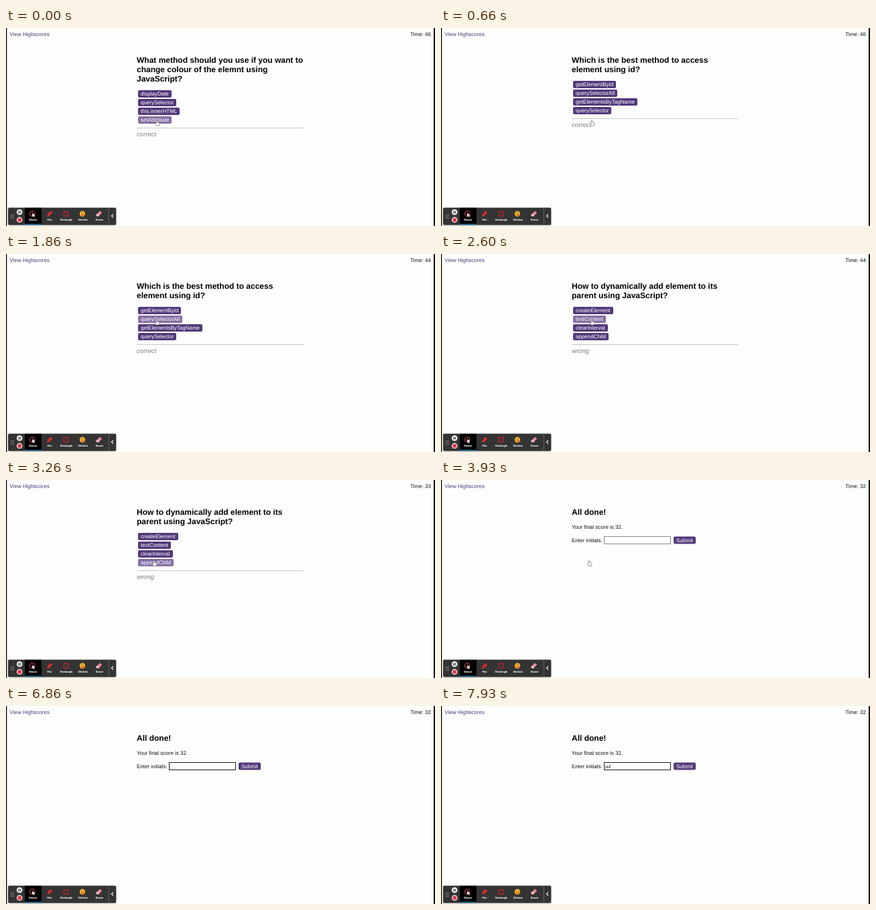
An HTML page for the animation above (8000 ms loop, 640x296 px).

```html
<!DOCTYPE html>
<html lang="en">
<head>
<meta charset="utf-8">
<title>Quiz</title>
<style>
  html, body { margin: 0; width: 100%; height: 100%; overflow: hidden; background: #fdfdfd; }
  #stage {
    position: relative; width: 640px; height: 296px; box-sizing: border-box; overflow: hidden;
    font: 8px/9px "Liberation Sans", Arial, sans-serif; color: #111;
    text-rendering: geometricPrecision; white-space: nowrap;
  }
  #stage > *, .done > * { position: absolute; }
  .scores { left: 5.5px; top: 5px; color: #483a7c; }
  .time { right: 6px; top: 5px; }
  .page { left: 195px; top: 41px; width: 249px; visibility: hidden; }
  h2 { margin: 0; font-size: 12px; line-height: 14px; color: #000; }
  .button {
    display: block; width: max-content; height: 11px; padding: 0 4px; border-radius: 2px;
    line-height: 11px; color: #fff; background: #53397b;
  }
  .button.hover { background: #8570a5; }
  .choices { padding: 10px 0 0 2px; }
  .choices .button { margin-bottom: 2px; }
  .feedback {
    margin-top: 6px; padding-top: 4px; border-top: 1px solid #c8c8cb;
    font: italic 9.6px/11px "Liberation Sans", Arial, sans-serif; color: #808080;
  }
  .score { left: 0; top: 25px; }
  .label { left: 0; top: 45px; }
  .field {
    left: 48px; top: 43px; width: 100px; height: 12px; box-sizing: border-box;
    padding: 1px 0 0 1px; border: 1px solid #8c8c8c; background: #fff;
  }
  .field.focus { border-color: #1c1c1c; }
  .caret { display: inline-block; width: 1px; height: 8px; background: #777; vertical-align: top; }
  .submit { left: 152px; top: 43px; transform: translateY(.5px); }
  svg { left: 0; top: 0; }
  .tools text { font: 700 4px Roboto, "Open Sans", sans-serif; fill: #fff; text-anchor: middle; }
</style>
</head>
<body>
<div id="stage">
  <div class="scores">View Highscores</div>
  <div class="time">Time: <span id="time">46</span></div>

  <div class="page done">
    <h2>All done!</h2>
    <div class="score">Your final score is 32.</div>
    <div class="label">Enter initials:</div>
    <div class="field" id="field"><span id="typed"></span><span class="caret" id="caret"></span></div>
    <div class="button submit">Submit</div>
  </div>

  <svg width="640" height="296" viewBox="0 0 640 296">
    <path d="M0 0H1.3V296H0ZM638 0H640V296H638Z"/>

    <g class="tools">
      <rect x="2.6" y="268.2" width="162.2" height="27" rx="2.4" fill="#000" opacity=".25"/>
      <rect x="3.2" y="268.8" width="161" height="25.8" rx="1.8" fill="#343434"/>
      <path d="M153.4 268.8v25.8" stroke="#777" stroke-width=".7"/>
      <rect x="28" y="268.8" width="25" height="25.4" fill="#000"/>
      <rect x="28" y="292.8" width="25" height="1.3" fill="#1b7fb8"/>
      <path d="M8 279v6M10.7 279v6" stroke="#bbb" stroke-width="1.2" stroke-dasharray="1.2 1.2"/>
      <circle cx="20.2" cy="275.3" r="4.3" fill="#eee"/>
      <path d="M19.1 273.4v3.8M21.3 273.4v3.8" stroke="#333" stroke-width="1.2"/>
      <circle cx="20.2" cy="286.8" r="4.3" fill="#f3d5d8"/>
      <rect x="17.6" y="284.2" width="5.2" height="5.2" rx="1" fill="#dc3545"/>
      <circle cx="39.3" cy="277.5" r="3.8" fill="none" stroke="#e0444a" stroke-width="1.1"/>
      <path d="M39.2 276.4l4.6 3.8-2.1.3 1.2 2.1-1 .5-1.1-2.1-1.6 1.3z" fill="#fff"/>
      <path d="M66.6 273.6l2.6 2.4-4.4 4.4-3.6 1.5 1-3.7z" fill="#e52a2a"/>
      <rect x="86.3" y="274.6" width="6.8" height="6.4" fill="none" stroke="#d81f2a" stroke-width="1.1"/>
      <circle cx="114" cy="277.7" r="4.2" fill="#f4b62c"/>
      <path d="M112 278.6h5.4q-.4 3-2.7 3t-2.7-3z" fill="#d8702a"/>
      <circle cx="112.5" cy="276.6" r=".6" fill="#57330f"/>
      <circle cx="115.5" cy="276.6" r=".6" fill="#57330f"/>
      <path d="M140.2 273.6l3 2.6-5 5.2-3-.2-1-2z" fill="#e58b9b"/>
      <path d="M136.2 277.5l3 2.8-1 1.1-3-.2-1-2z" fill="#efc0c8"/>
      <path d="M160 278.3l-2.6 2.7 2.6 2.7" fill="none" stroke="#fff" stroke-width="1.1"/>
      <text x="40.3" y="288.4">Mouse</text>
      <text x="65" y="288.4">Pen</text>
      <text x="90" y="288.4">Rectangle</text>
      <text x="114.8" y="288.4">Stickers</text>
      <text x="139.5" y="288.4">Eraser</text>
    </g>

    <g id="cursor" fill="#fff" stroke="#555" stroke-width=".6" stroke-linejoin="round">
      <path id="hand" d="M-.9 .6Q0-.4 .9 .6V3L3.4 3.7Q4.2 4 4 5L3.4 8H-1L-2.9 5.2Q-2.6 4-.9 5Z"/>
      <path id="arrow" d="M0 0V8L1.9 6.3 3 9 4.2 8.5 3.1 5.9H5.6Z"/>
    </g>
    <circle id="ring" r="13.4" fill="none" stroke="#e58383" stroke-width="1.4"/>
  </svg>
</div>

<script>
const LOOP = 8000;
const $ = id => document.getElementById(id);
const stage = $('stage');

const questions = [
  [['What method should you use if you want to', 'change colour of the elemnt using', 'JavaScript?'],
   ['displayDate', 'querySelector', 'this.innerHTML', 'setAttribiute'], 'correct'],
  [['Which is the best method to access', 'element using id?'],
   ['getElementById', 'querySelectorAll', 'getElementsByTagName', 'querySelector'], 'correct'],
  [['How to dynamically add element to its', 'parent using JavaScript?'],
   ['createElement', 'textContent', 'clearInterval', 'appendChild'], 'wrong'],
];

const done = document.querySelector('.done');
const pages = questions.map(([title, choices, feedback]) => {
  const page = document.createElement('div');
  page.className = 'page';
  page.innerHTML = `<h2>${title.join('<br>')}</h2><div class="choices">` +
    choices.map(c => `<div class="button">${c}</div>`).join('') +
    `</div><div class="feedback">${feedback}</div>`;
  stage.insertBefore(page, done);
  return page;
});
pages.push(done);

// [start time, value]
const pageAt = [[0, 0], [400, 1], [2460, 2], [3860, 3]];
const timeAt = [[0, 46], [860, 45], [1860, 44], [2860, 33], [3860, 32]];
const typedAt = [[0, ''], [6930, 'u'], [7190, 'uz']];
// [start, end, x, y]
const clicks = [[270, 410, 225, 138], [2330, 2590, 225, 98], [3530, 3850, 221, 120.5], [5260, 5400, 258, 90]];
// [start, end, from, to]
const moves = [
  [1260, 1530, [225, 138], [225, 98]],
  [2860, 3200, [225, 98], [221, 120.5]],
  [4390, 4530, [221, 120.5], [258, 90]],
];
const FOCUS = 5260, BLINK = 533;

const valueAt = (track, t) => track.findLast(([start]) => t >= start)[1];
const ease = p => p * p * (3 - 2 * p);
const show = (el, on) => { el.style.visibility = on ? 'visible' : 'hidden'; };
const place = (el, x, y) => el.setAttribute('transform', `translate(${x} ${y})`);

function pointerAt(t) {
  const [start, end, from, to] = moves.findLast(m => t >= m[0]) || moves[0];
  const p = ease(Math.min(1, Math.max(0, (t - start) / (end - start))));
  return { x: from[0] + (to[0] - from[0]) * p, y: from[1] + (to[1] - from[1]) * p, moving: p > 0 && p < 1 };
}

function render(t) {
  const current = valueAt(pageAt, t);
  pages.forEach((page, i) => show(page, i === current));
  $('time').textContent = valueAt(timeAt, t);

  const { x, y, moving } = pointerAt(t);
  let over = false;
  for (const button of pages[current].querySelectorAll('.button')) {
    const r = button.getBoundingClientRect();
    const hit = x >= r.left && x < r.right && y >= r.top && y < r.bottom;
    button.classList.toggle('hover', hit);
    over ||= hit;
  }
  const visible = t < 4530, arrow = moving && !over;
  place($('cursor'), x, y);
  show($('hand'), visible && !arrow);
  show($('arrow'), visible && arrow);

  const click = clicks.find(([start, end]) => t >= start && t < end);
  show($('ring'), click);
  if (click) place($('ring'), click[2], click[3]);

  $('field').classList.toggle('focus', t >= FOCUS);
  $('typed').textContent = valueAt(typedAt, t);
  show($('caret'), t >= FOCUS && Math.floor((t - FOCUS) / BLINK) % 2 === 0);
}

const origin = performance.now();
function tick() {
  render((performance.now() - origin) % LOOP);
  requestAnimationFrame(tick);
}
tick();
</script>
</body>
</html>
```
